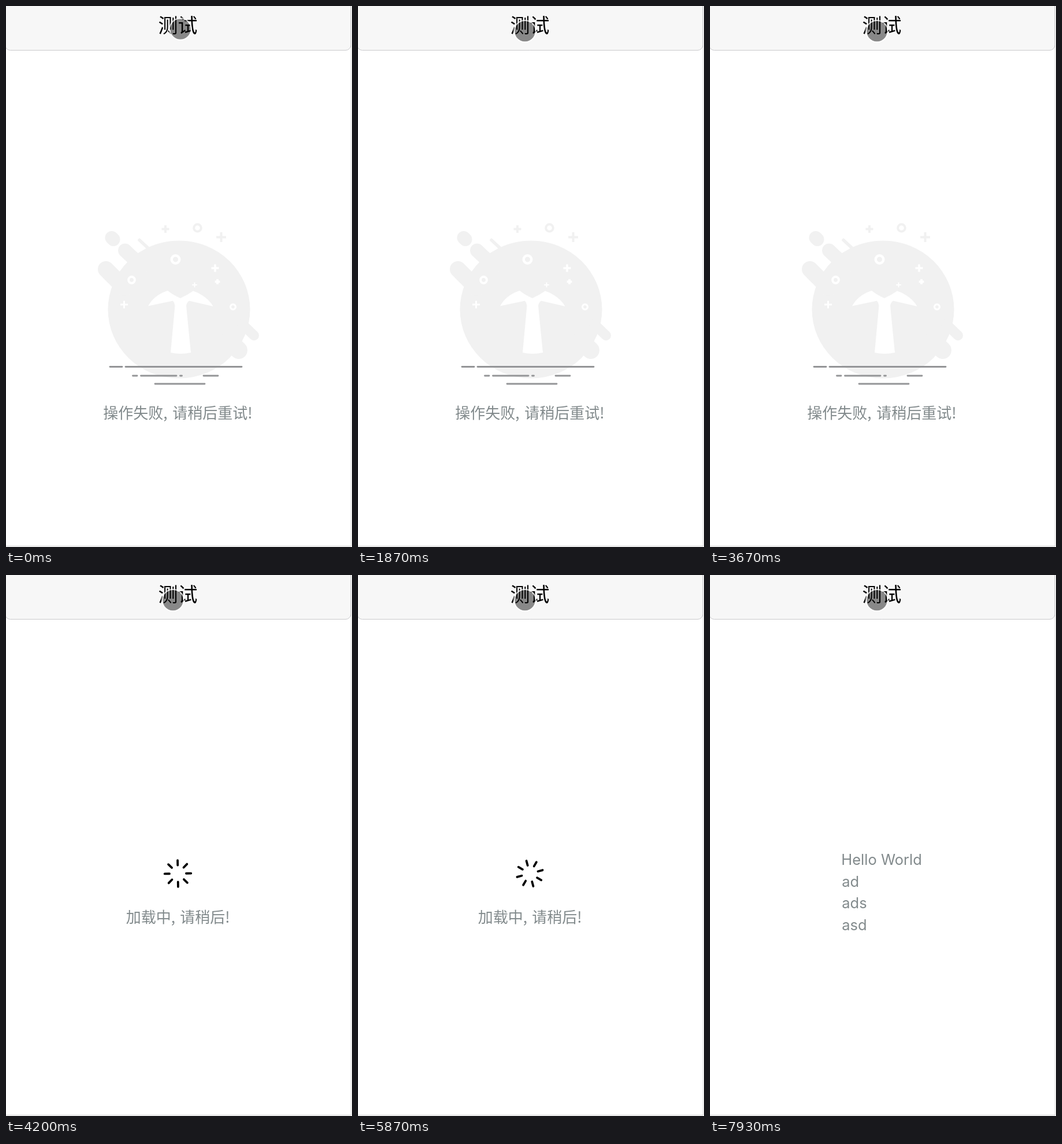
An HTML page with a canvas that plays this animation: 599x935 px, repeating every 8000 ms.

```html
<!DOCTYPE html>
<html lang="zh-CN">
<head>
<meta charset="utf-8">
<title>测试</title>
<style>
html, body { margin: 0; width: 100%; height: 100%; overflow: hidden; background: #fff; }
canvas { display: block; width: 599px; height: 935px; }
</style>
</head>
<body>
<canvas id="stage" width="599" height="935"></canvas>
<script>
const ctx = document.getElementById('stage').getContext('2d');
const LOOP = 8000;
const STEP = 200 / 3;       // 15 pictures a second
const LOAD = 1000;          // how long one request takes
const TAPS = [620, 2387, 4078, 5787];
const CJK = '"Noto Sans CJK SC", "Noto Sans CJK", sans-serif';
const PALE = '#f1f1f1', WHITE = '#fff', GRAY = '#828a8c', INK = '#949597';

// Places the visible left edge of the text at x.
function label(text, x, y, font, color) {
  ctx.font = font;
  ctx.fillStyle = color;
  ctx.fillText(text, x + ctx.measureText(text).actualBoundingBoxLeft, y);
}

function line(x1, y1, x2, y2, width, color, cap = 'round') {
  ctx.lineCap = cap;
  ctx.lineWidth = width;
  ctx.strokeStyle = color;
  ctx.beginPath();
  ctx.moveTo(x1, y1);
  ctx.lineTo(x2, y2);
  ctx.stroke();
}

function ring(x, y, r, width, color) {
  ctx.lineWidth = width;
  ctx.strokeStyle = color;
  ctx.beginPath();
  ctx.arc(x, y, r, 0, 2 * Math.PI);
  ctx.stroke();
}

function plus(x, y, half, width, color) {
  line(x - half, y, x + half, y, width, color, 'butt');
  line(x, y - half, x, y + half, width, color, 'butt');
}

function drawPage() {
  ctx.fillStyle = WHITE;
  ctx.fillRect(0, 0, 599, 935);
  line(597.5, 0, 597.5, 934, 1, '#d6d6d6', 'butt');
  line(0, 933.5, 598, 933.5, 1, '#cfcfcf', 'butt');
  ctx.beginPath();
  ctx.roundRect(-1.5, -20, 598.5, 96.5, 9);
  ctx.fillStyle = '#f7f7f7';
  ctx.fill();
  ctx.lineWidth = 1;
  ctx.strokeStyle = '#c9c9cc';
  ctx.stroke();
  label('测试', 264.5, 46, '34px ' + CJK, '#000');
}

function drawTree() {
  ctx.fillStyle = WHITE;
  ctx.beginPath();
  ctx.moveTo(246, 518.5);
  ctx.quadraticCurveTo(257, 499, 280, 492);
  ctx.quadraticCurveTo(290, 500, 302, 505);
  ctx.quadraticCurveTo(313, 500, 324, 492.5);
  ctx.quadraticCurveTo(348, 501, 358.5, 519);
  ctx.lineTo(317, 509.5);
  ctx.quadraticCurveTo(313, 512, 312, 518);
  ctx.lineTo(320, 599);
  ctx.quadraticCurveTo(302, 603, 285, 599);
  ctx.lineTo(292.5, 518);
  ctx.quadraticCurveTo(292, 513, 289, 509.5);
  ctx.closePath();
  ctx.fill();
}

function drawError() {
  ctx.fillStyle = PALE;
  ctx.beginPath();
  ctx.ellipse(299.5, 524.5, 123, 119, 0, 0, 2 * Math.PI);
  ctx.fill();

  line(183, 400.5, 186, 403.5, 23, PALE);
  line(206, 422.5, 235, 450, 24, PALE);
  line(231, 404.5, 252, 424, 5.5, PALE);
  line(173, 455, 205, 487, 28, PALE);
  line(429.5, 569.5, 408, 549, 17, PALE);
  line(403, 595, 385, 578, 30, PALE);

  plus(276, 385.5, 6.5, 4, PALE);
  plus(372.5, 399.5, 8.5, 4, PALE);
  ring(331.5, 383.5, 6.3, 4, PALE);

  ring(293.5, 438, 6.8, 4.4, WHITE);
  ring(217.5, 473.5, 5.4, 4, WHITE);
  ring(393, 520, 4.4, 3.2, WHITE);
  plus(362, 453, 6.5, 3.6, WHITE);
  plus(366, 476.5, 4.3, 4, WHITE);
  plus(326.5, 482, 4.3, 2, WHITE);
  plus(204.5, 516, 6.5, 3, WHITE);
  drawTree();

  const dashes = [
    [623.5, 180, 201], [623.5, 207, 408],
    [639, 219.5, 227], [639, 233.5, 295], [639, 301.5, 304.5], [639, 342, 367],
    [653, 258, 344]
  ];
  for (const [y, from, to] of dashes) line(from, y, to, y, 2.8, INK);

  label('操作失败,', 168.3, 713, '26px ' + CJK, GRAY);
  label('请稍后重试!', 289.3, 713, '26px ' + CJK, GRAY);
}

function drawLoading(elapsed) {
  const turn = elapsed / 1000 * 2 * Math.PI;
  for (let i = 0; i < 8; i++) {
    const a = turn + i * Math.PI / 4, c = Math.cos(a), s = Math.sin(a);
    line(297.5 + 14.5 * c, 516 + 14.5 * s, 297.5 + 22.8 * c, 516 + 22.8 * s, 3.8, '#000');
  }
  label('加载中,', 207.7, 601, '26px ' + CJK, GRAY);
  label('请稍后!', 302.3, 601, '26px ' + CJK, GRAY);
}

function drawResult() {
  ['Hello World', 'ad', 'ads', 'asd'].forEach((text, i) =>
    label(text, 229.3, 501.3 + i * 37.5, '25.5px Inter, sans-serif', GRAY));
}

function drawPointer(t) {
  const p = Math.min(1, Math.max(0, t / 500));
  const ease = p * p * (3 - 2 * p);
  const x = 302 - 13 * ease, y = 40 + 3.7 * ease;
  ctx.fillStyle = 'rgba(0,0,0,.45)';
  ctx.beginPath();
  ctx.arc(x, y, 17.8, 0, 2 * Math.PI);
  ctx.fill();
  ring(x, y, 18.8, 2, 'rgba(255,255,255,.75)');
}

function draw(now) {
  const step = Math.floor((now % LOOP + 4) / STEP);
  const t = Math.round(step * STEP / 10) * 10 % LOOP;
  const tap = TAPS.filter(at => at <= t).pop();
  drawPage();
  if (tap !== undefined && t - tap < LOAD) drawLoading(t - tap);
  else if (tap === TAPS[TAPS.length - 1]) drawResult();
  else drawError();
  drawPointer(t);
}

const start = performance.now();
function tick() {
  draw(performance.now() - start);
  requestAnimationFrame(tick);
}
tick();
</script>
</body>
</html>
```
